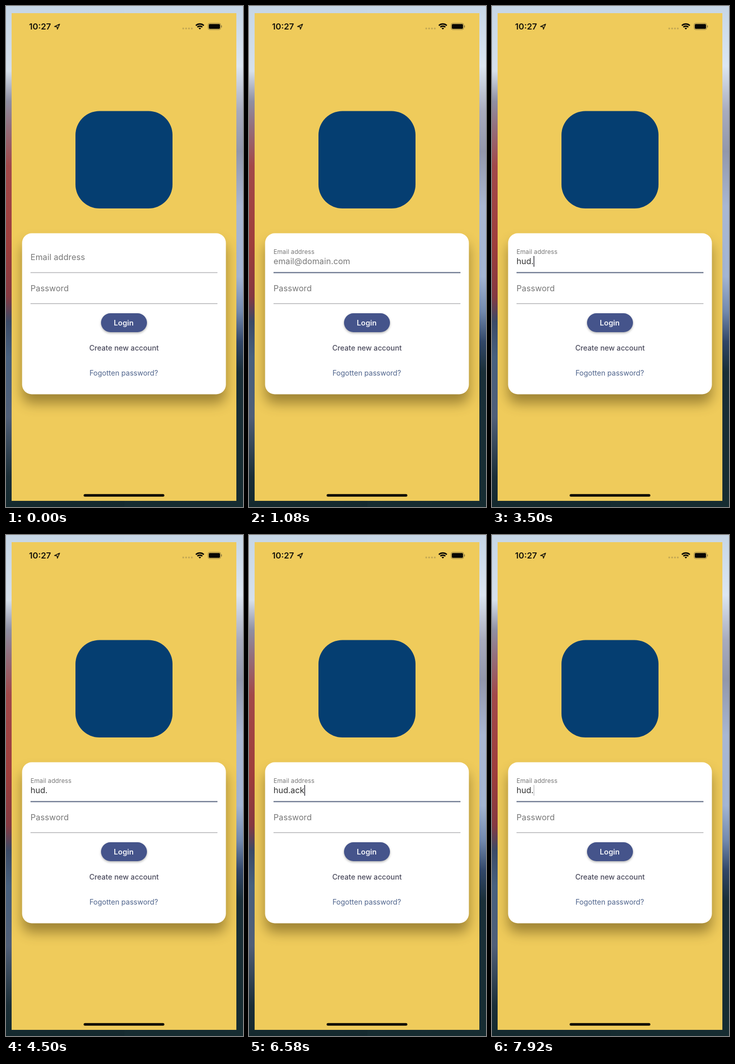
Write an HTML page that moves like this. It is 464 px wide and 980 px high and loops after 8 s.

```html
<!DOCTYPE html>
<html lang="en">
<head>
<meta charset="utf-8">
<title>Login screen</title>
<style>
  html, body { margin: 0; width: 100%; height: 100%; overflow: hidden; }
  svg { display: block; width: 100vw; height: 100vh; font: 16px Inter, sans-serif; }
  .card { filter: drop-shadow(0 18px 12px rgba(50, 35, 0, .42)); }
  .button { filter: drop-shadow(0 2px 2px rgba(0, 0, 0, .3)); }
  .hint { fill: #777; letter-spacing: .1px; }
  .center { text-anchor: middle; }
</style>
</head>
<body>
<svg viewBox="0 0 464 980" preserveAspectRatio="none">
  <defs>
    <linearGradient id="leftEdge" x2="0" y2="1">
      <stop offset="0" stop-color="#c6d6e6"/>
      <stop offset=".13" stop-color="#d6e0eb"/>
      <stop offset=".19" stop-color="#8f8fa2"/>
      <stop offset=".24" stop-color="#93707e"/>
      <stop offset=".32" stop-color="#a2494a"/>
      <stop offset=".48" stop-color="#9e3e3c"/>
      <stop offset=".58" stop-color="#863a42"/>
      <stop offset=".63" stop-color="#3b4b67"/>
      <stop offset=".7" stop-color="#48617f"/>
      <stop offset=".82" stop-color="#505f78"/>
      <stop offset=".94" stop-color="#1b2e37"/>
      <stop offset="1" stop-color="#14292e"/>
    </linearGradient>
    <linearGradient id="rightEdge" x2="0" y2="1">
      <stop offset="0" stop-color="#c6d6e6"/>
      <stop offset=".12" stop-color="#dce6f1"/>
      <stop offset=".21" stop-color="#a8abbd"/>
      <stop offset=".29" stop-color="#9297ab"/>
      <stop offset=".4" stop-color="#a9b7d2"/>
      <stop offset=".54" stop-color="#a3b5d3"/>
      <stop offset=".61" stop-color="#7289ae"/>
      <stop offset=".67" stop-color="#324768"/>
      <stop offset=".73" stop-color="#1a2f38"/>
      <stop offset="1" stop-color="#162c31"/>
    </linearGradient>
  </defs>

  <rect width="232" height="980" fill="url(#leftEdge)"/>
  <rect x="232" width="232" height="980" fill="url(#rightEdge)"/>
  <rect x="11" y="14" width="440" height="954" fill="#efcb5b"/>

  <!-- status bar -->
  <text x="45" y="46" font-size="16.6" font-weight="600" fill="#16130a">10:27</text>
  <path d="M95 40.2 105 35.5 100.6 45.5 100 40.8Z" fill="none" stroke="#16130a" stroke-width="1.5" stroke-linejoin="round"/>
  <path d="M347 44H364" stroke="#c0a552" stroke-width="3.4" stroke-linecap="round" stroke-dasharray="0 5.6"/>
  <g fill="none" stroke="#0c0a05" stroke-width="2.6">
    <path d="M371.7 38.2A11.4 11.4 0 0 1 387.3 38.2M374.6 41.4A7 7 0 0 1 384.4 41.4"/>
    <path d="M377 43.4A4 4 0 0 1 382 43.4L379.5 46Z" fill="#0c0a05" stroke="none"/>
  </g>
  <rect x="395.5" y="33.7" width="25" height="12.6" rx="3.5" fill="none" stroke="#988344"/>
  <rect x="397" y="35.2" width="22" height="9.6" rx="2" fill="#080703"/>
  <path d="M422 38v4" stroke="#988344" stroke-width="1.6"/>

  <rect x="136" y="205.5" width="190" height="190.5" rx="47" fill="#053e71"/>

  <rect class="card" x="31.5" y="444.5" width="399" height="315" rx="19" fill="#fff"/>
  <text id="label" class="hint">Email address</text>
  <text id="placeholder" class="hint" x="48" y="505">email@domain.com</text>
  <text id="entry" x="48" y="505" fill="#303030"></text>
  <rect id="caret" y="489" width="1.6" height="21" fill="#45454c"/>
  <path d="M48 521.5H414M48 582.3H414" stroke="#b5b5b7" stroke-width="1.5"/>
  <path id="underline" stroke="#626e88" stroke-width="2"/>
  <text class="hint" x="48" y="558">Password</text>

  <rect class="button" x="186" y="601" width="90" height="37" rx="18.5" fill="#45548b"/>
  <g class="center">
    <text x="230.5" y="624.5" font-size="14.5" font-weight="600" fill="#f2f3f8">Login</text>
    <text x="231" y="674" font-size="14.2" font-weight="500" fill="#4a4a5c">Create new account</text>
    <text x="230.5" y="723" font-size="14" fill="#4f648c">Fogotten password?</text>
  </g>
  <rect x="152" y="954.8" width="158" height="5" rx="2.5" fill="#080703"/>
</svg>
<script>
const LOOP = 8000, FOCUS = 420, BLINK = 850;
const NAME = "hud.ack";

// [time, number of typed characters]
const edits = [
  [FOCUS, 0], [1480, 1], [1640, 2], [1800, 3], [1960, 4], [2120, 5],
  [2350, 6], [2550, 7], [2750, 6], [2900, 5], [3050, 4],
  [5600, 5], [5900, 6], [6250, 7], [7020, 6], [7170, 5], [7350, 4]
];

const $ = id => document.getElementById(id);
const clamp = x => Math.min(1, Math.max(0, x));
const easeOut = x => 1 - (1 - clamp(x)) ** 3;

function caretOpacity(sinceEdit) {
  const phase = sinceEdit % BLINK;
  return phase < 675 ? clamp((600 - phase) / 100) : clamp((phase - 750) / 100);
}

function draw(t) {
  const focused = t >= FOCUS;
  const lift = easeOut((t - FOCUS) / 350);
  const spread = focused ? 183 * (0.5 + easeOut((t - FOCUS) / 300) / 2) : 0;
  const [editTime, count] = edits.filter(([time]) => time <= t).pop() || [0, 0];

  $("label").setAttribute("transform", `translate(48 ${497 - 12 * lift}) scale(${1 - lift / 4})`);
  $("placeholder").setAttribute("opacity", count ? 0 : clamp((t - FOCUS - 100) / 250));
  $("underline").setAttribute("d", focused ? `M${231 - spread} 521.5H${231 + spread}` : "");
  $("entry").textContent = NAME.slice(0, count);
  $("caret").setAttribute("x", 48 + (count ? $("entry").getComputedTextLength() : 0));
  $("caret").setAttribute("opacity", focused ? caretOpacity(t - editTime) : 0);
}

function tick() {
  draw(performance.now() % LOOP);
  requestAnimationFrame(tick);
}
tick();
</script>
</body>
</html>
```
